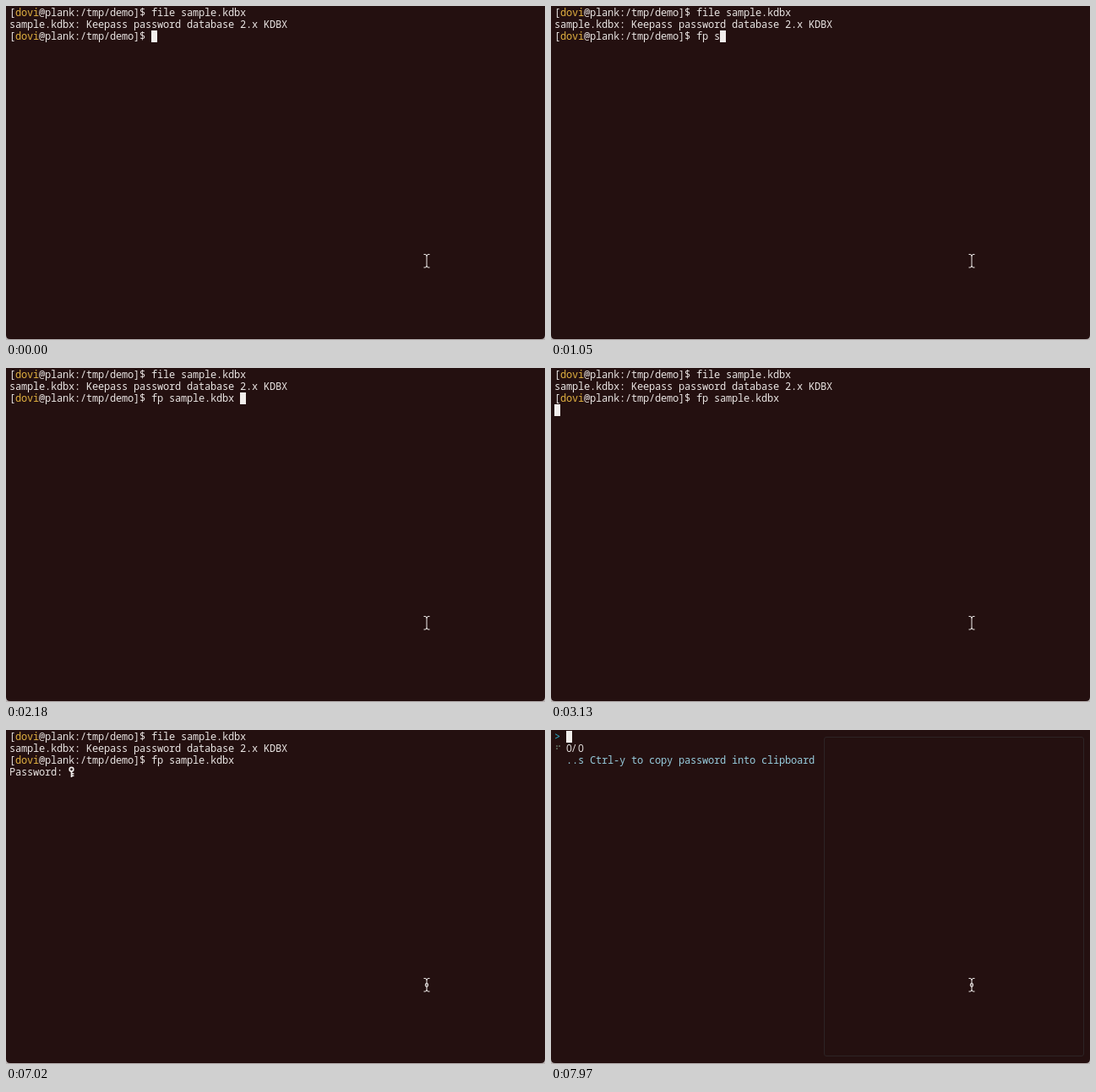
An HTML page that plays this animation: 638x396 px, repeating every 8000 ms.

```html
<!DOCTYPE html>
<html lang="en">
<head>
<meta charset="utf-8">
<title>Terminal</title>
<style>
  html, body { margin: 0; width: 100%; height: 100%; overflow: hidden; background: #b9b3b3; }
  svg { display: block; width: 638px; height: 396px; }
  text { font: 12px "Noto Sans Mono", "DejaVu Sans Mono", monospace; fill: #eae5e3; white-space: pre; }
  .user { fill: #e0b040; }
  .prompt { fill: #2bb0cc; }
  .count { font-family: "Open Sans", "Noto Sans", sans-serif; }
  .header { fill: #97cbdc; }
  .block { fill: #f2eeec; }
  .line { fill: none; stroke: #f2eeec; }
  .frame { fill: none; stroke: #2d2425; }
  .spinner { fill: #7f9f88; }
</style>
</head>
<body>
<svg viewBox="0 0 638 396">
  <path fill="#241010" d="M0 0H638V390Q638 395 633 395H5Q0 395 0 390Z"/>
  <g id="shell"></g>
  <g id="key">
    <circle class="line" cx="77.5" cy="46.7" r="2.3" stroke-width="1.7"/>
    <path class="block" d="M76.7 49h1.7v2h2v1.4h-2v1.2h2v1.4h-2v1h-1.7z"/>
  </g>
  <g id="finder">
    <rect class="frame" x="323.5" y="8.5" width="307" height="378" rx="2.5"/>
    <g id="spinner" class="spinner"></g>
  </g>
  <rect id="caret" class="block" width="7" height="14"/>
  <path class="line" d="M494.5 294.5h1.5q2 0 2 2q0-2 2-2h1.5M498 296V308.5M494.5 310h1.5q2 0 2-2q0 2 2 2h1.5"/>
  <ellipse id="busy" class="line" cx="498" cy="302.3" rx="1.7" ry="2.2"/>
</svg>
<script>
  const LOOP = 8000, COL = 7, ROW = 14, LEFT = 4, TOP = 1;
  const SVG = "http://www.w3.org/2000/svg";
  const $ = id => document.getElementById(id);
  const shell = $("shell"), finder = $("finder");

  function add(parent, tag, attrs) {
    const el = document.createElementNS(SVG, tag);
    for (const name in attrs) el.setAttribute(name, attrs[name]);
    return parent.appendChild(el);
  }

  // Each character sits in its own terminal cell.
  function put(parent, row, col, str, cls = "") {
    const x = [...str].map((_, i) => LEFT + (col + i) * COL).join(" ");
    const el = add(parent, "text", { x, y: TOP + row * ROW + 11, class: cls });
    el.textContent = str;
    return el;
  }

  function putPrompt(row) {
    put(shell, row, 0, "[");
    put(shell, row, 1, "dovi", "user");
    put(shell, row, 5, "@plank:/tmp/demo]$");
  }

  const COMMAND = "fp sample.kdbx ";
  putPrompt(0);
  put(shell, 0, 24, "file sample.kdbx");
  put(shell, 1, 0, "sample.kdbx: Keepass password database 2.x KDBX");
  putPrompt(2);
  const typed = put(shell, 2, 24, COMMAND);
  const password = put(shell, 3, 0, "Password:");

  put(finder, 0, 0, ">", "prompt");
  put(finder, 1, 2, "0/0", "count");
  put(finder, 2, 2, "..s Ctrl-y to copy password into clipboard", "header");

  // Braille dots 1-6: left column, then right column.
  const dots = Array.from({ length: 6 }, (_, i) => add($("spinner"), "circle", {
    cx: i < 3 ? 7 : 10, cy: 19 + (i % 3) * 3, r: 0.85
  }));
  const SPIN = ["124", "145", "1456", "456", "3456", "356", "236", "1236", "1234"];

  const KEYS = [300, 540, 810, 1050, 1110, 1340, 1520, 1700, 1820];
  const TICKS = [7200, 7320, 7380, 7500, 7560, 7680, 7790, 7910, 7970];
  const COMPLETE = 2180, ENTER = 3130, ASK = 3190, BUSY = 7020, FIND = 7140;

  const passed = (times, t) => times.filter(at => t >= at).length;
  const show = (el, on) => { el.style.display = on ? "" : "none"; };

  function render(t) {
    const length = t >= COMPLETE ? COMMAND.length : passed(KEYS, t);
    const finding = t >= FIND;
    const asking = t >= ASK && !finding;

    typed.textContent = COMMAND.slice(0, length);
    show(shell, !finding);
    show(finder, finding);
    show(password, asking);
    show($("key"), asking);
    show($("busy"), t >= BUSY);

    let cell = [24 + length, 2];
    if (finding) cell = [2, 0];
    else if (t >= ENTER) cell = [0, 3];
    const caret = $("caret");
    caret.setAttribute("x", LEFT + cell[0] * COL);
    caret.setAttribute("y", TOP + cell[1] * ROW);
    show(caret, !asking);

    const pattern = SPIN[passed(TICKS, t) % SPIN.length];
    dots.forEach((dot, i) => show(dot, pattern.includes(i + 1)));
  }

  const start = performance.now();
  function tick() {
    render((performance.now() - start) % LOOP);
    requestAnimationFrame(tick);
  }
  tick();
</script>
</body>
</html>
```
